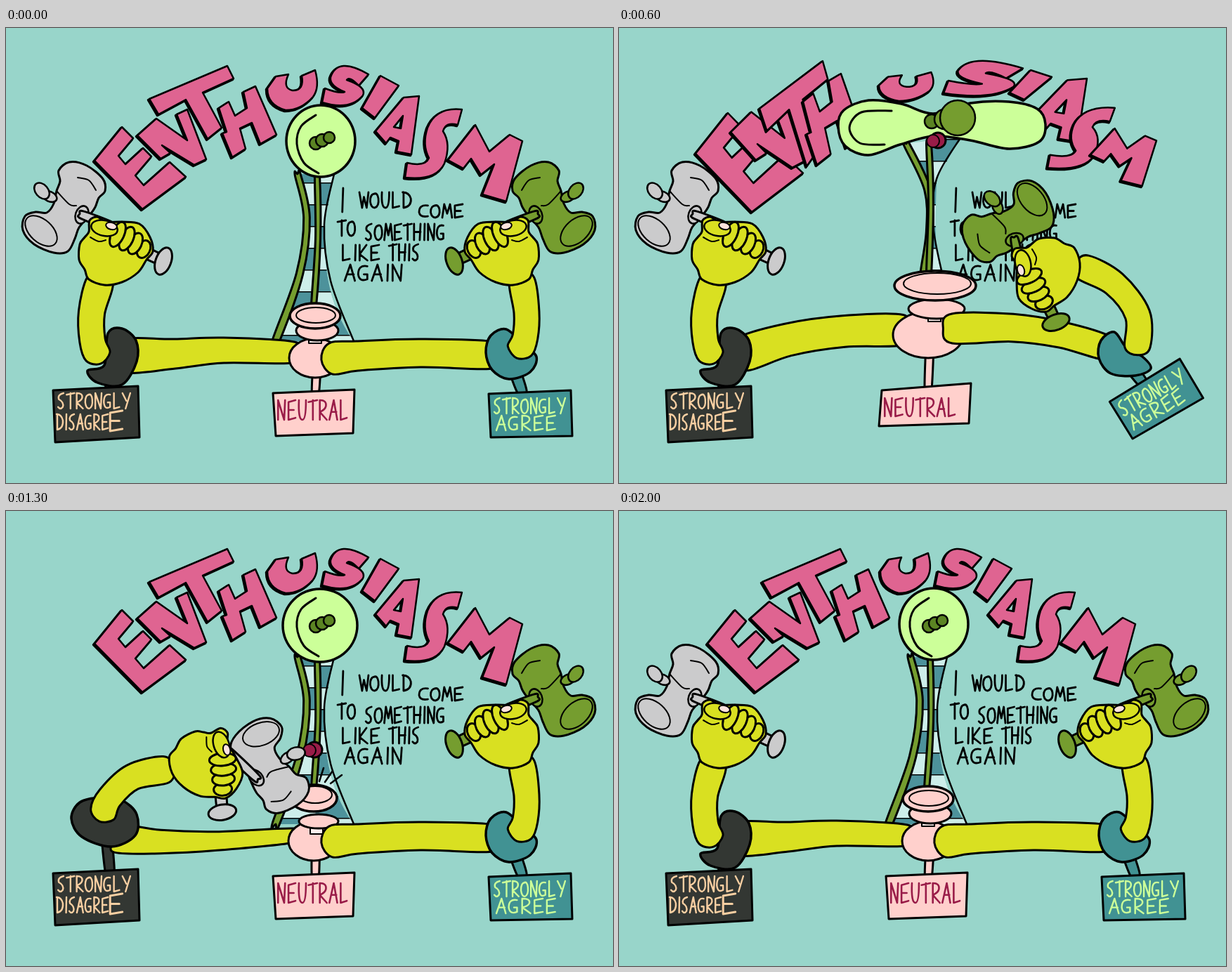
Write an HTML page with a canvas that moves like this. It is 864x648 px and loops after 2100 ms.

```html
<!DOCTYPE html>
<html lang="en">
<head>
<meta charset="utf-8">
<title>Enthusiasm</title>
<style>
html, body { margin: 0; width: 100%; height: 100%; overflow: hidden; background: #98d5ca; }
canvas { display: block; }
</style>
</head>
<body>
<canvas id="stage" width="864" height="648" role="img"
  aria-label="Enthusiasm: I would come to something like this again. Strongly disagree, neutral, strongly agree."></canvas>
<script>
const ctx = document.getElementById('stage').getContext('2d');
const YELLOW = '#d9e021', PINK = '#ffd0cc', ROSE = '#df6491', DARK = '#333733', TEAL = '#419293',
  GREEN = '#759d2f', GREY = '#cbcbcc', LIME = '#ccff99', MAROON = '#991c48', PALE = '#cdeeea';

const pts = s => s.split(' ').map(p => p.split(',').map(Number));
const mix = (a, b, t) => Array.isArray(a) ? a.map((v, i) => mix(v, b[i], t)) : a + (b - a) * t;

// Smooth path through points (Catmull-Rom)
function smooth(p, closed = true) {
  const path = new Path2D(), n = p.length;
  const at = i => closed ? p[(i + n) % n] : p[Math.max(0, Math.min(n - 1, i))];
  path.moveTo(...p[0]);
  for (let i = 0; i < (closed ? n : n - 1); i++) {
    const [a, b, c, d] = [at(i - 1), at(i), at(i + 1), at(i + 2)];
    path.bezierCurveTo(b[0] + (c[0] - a[0]) / 6, b[1] + (c[1] - a[1]) / 6,
      c[0] - (d[0] - b[0]) / 6, c[1] - (d[1] - b[1]) / 6, ...c);
  }
  if (closed) path.closePath();
  return path;
}

function ink(path, fill, width = 3) {
  ctx.fillStyle = fill;
  ctx.strokeStyle = '#000';
  ctx.lineWidth = width;
  if (fill) ctx.fill(path, 'evenodd');
  ctx.stroke(path);
}
const blob = (p, fill, width) => ink(smooth(p), fill, width);
const line = (p, width) => ink(smooth(p, false), null, width);
const poly = (p, fill) => ink(new Path2D('M' + p.join('L') + 'Z'), fill);

function oval(x, y, rx, ry, fill, deg = 0, width) {
  const path = new Path2D();
  path.ellipse(x, y, rx, ry, deg * Math.PI / 180, 0, 7);
  ink(path, fill, width);
}

// Limb with a width that runs from w0 to w1
function tube(p, w0, w1, fill, tip = .3) {
  const left = [], right = [], n = p.length - 1;
  const dir = i => {
    const a = p[Math.max(0, i - 1)], b = p[Math.min(n, i + 1)], l = Math.hypot(b[0] - a[0], b[1] - a[1]) || 1;
    return [(b[0] - a[0]) / l, (b[1] - a[1]) / l];
  };
  p.forEach(([x, y], i) => {
    const [dx, dy] = dir(i), h = mix(w0, w1, i / n) / 2;
    left.push([x - dy * h, y + dx * h]);
    right.unshift([x + dy * h, y - dx * h]);
  });
  const [sx, sy] = dir(0), [ex, ey] = dir(n);
  blob([...left, [p[n][0] + ex * w1 * tip, p[n][1] + ey * w1 * tip], ...right,
    [p[0][0] - sx * w0 * tip, p[0][1] - sy * w0 * tip]], fill);
}

function placed(x, y, deg, draw) {
  ctx.save();
  ctx.translate(x, y);
  ctx.rotate(deg * Math.PI / 180);
  draw();
  ctx.restore();
}

// Hand lettering on a 10 x 10 grid
const glyphs = {
  A: 'M0 10L5 0L9 10M2 6L8 6', C: 'M9 1Q0 0 0 6Q1 10 9 9', D: 'M1 0L1 10Q10 9 9 4Q7 0 0 0',
  E: 'M9 0L1 1L1 10L9 9M1 5L7 5', G: 'M8 1Q0 0 0 6Q1 11 8 9L8 6L5 6', H: 'M1 0L1 10M9 0L8 10M1 5L9 5',
  I: 'M5 0L4 10', K: 'M1 0L1 10M8 0L1 6L9 10', L: 'M1 0L1 10L8 9', M: 'M0 10L2 0L5 7L8 0L10 10',
  N: 'M1 10L1 0L8 10L9 0', O: 'M5 1Q0 1 0 6Q1 10 5 10Q10 9 9 4Q8 0 4 1',
  R: 'M1 10L1 0Q9 0 8 3Q7 5 1 6L9 10', S: 'M8 0Q0 1 2 4Q9 6 7 9Q4 11 1 9',
  T: 'M0 1L10 0M5 0L5 10', U: 'M1 0Q0 10 5 10Q9 10 9 0', W: 'M0 0L3 10L5 3L8 10L10 0', Y: 'M0 0L5 5M10 0L4 10'
};
function write(word, x, y, w, h, color, width = 2.4) {
  const share = c => c === 'I' ? .45 : 1;
  const unit = w / [...word].reduce((sum, c) => sum + share(c), 0);
  const path = new Path2D();
  for (const c of word) {
    const size = unit * share(c);
    path.addPath(new Path2D(glyphs[c]), new DOMMatrix([size * .084, 0, 0, h / 10, x, y]));
    x += size;
  }
  ctx.strokeStyle = color;
  ctx.lineWidth = width;
  ctx.stroke(path);
}

// Title letters: outline and its box
const letters = [
  ['M126 189L165 141L181 157L160 182L170 194L195 171L207 183L184 210L196 224L233 191L256 212L194 258Z', 126, 141, 130, 117],
  ['M187 153L214 129L258 160L243 123L258 116L285 187L268 195L222 167L234 178L220 186Z', 186, 116, 99, 80],
  ['M204 101L315 54L324 72L280 92L307 142L287 158L256 102L217 123Z', 204, 54, 121, 104],
  ['M303 114L317 105L326 125L343 114L338 91L355 83L385 152L362 165L350 135L333 143L341 172L322 184L308 150L314 148Z', 303, 83, 82, 101],
  ['M372 86L384 69L402 66Q393 86 408 89Q425 89 421 68L440 60Q447 85 437 98Q420 117 398 117Q372 110 372 86Z', 372, 60, 75, 57],
  ['M516 66L502 82Q488 68 485 74Q514 84 508 96Q490 118 450 106L454 86Q475 94 482 91Q460 82 462 70Q472 40 516 66Z', 450, 52, 66, 60],
  ['M533 68L559 82L525 128L507 114Z', 507, 68, 52, 60],
  ['M566 99L588 97L577 180L556 176L559 161L547 156L541 164L526 147ZM565 125L562 143L552 141Z', 526, 97, 62, 83],
  ['M649 116L643 138Q626 133 622 147Q634 165 624 193Q612 218 568 213L571 192Q597 198 602 185Q592 166 600 142Q612 112 649 116Z', 568, 114, 82, 102],
  ['M629 188L668 138L688 176L717 152L735 161L712 247L678 237L695 194L676 209L662 186L651 200Z', 629, 138, 106, 109]
];
const boxes = letters.map(l => l.slice(1));
const round = (x, y, rx, ry) => Array.from({ length: 16 }, (_, i) => {
  const a = Math.PI * (1 + i / 8);
  return [x + rx * Math.cos(a), y + ry * Math.sin(a)];
});

// Hands: fist x, y, angle, then gavel head x, y, angle; the right one is mirrored
const rest = {
  title: boxes,
  disc: round(448, 161, 49, 51),
  arc: pts('441,124 420,140 414,165 424,192 445,207'),
  boss: [[441, 164, 9], [450, 160, 9], [460, 156, 8]],
  edgeL: pts('411,208 424,270 414,350 380,446'),
  edgeR: pts('467,208 453,280 462,360 495,446'),
  rod: pts('443,210 444,300 438,396'),
  stripW: 10,
  cup: [[440, 470, 37, 28], [443, 431, 30, 14], [440, 410, 36, 18], [441, 409, 28, 11]],
  plate: pts('380,520 496,515 494,577 384,581'),
  label: [386, 530, 104, 28],
  armL: pts('170,467 240,464 310,459 410,462'), armLW: [48, 30],
  armR: pts('462,471 500,467 590,463 695,466'), armRW: [44, 38],
  cuffL: pts('145,435 165,428 185,445 186,475 165,508 130,505 116,488 140,480'),
  foreL: pts('134,360 122,405 123,445 131,468'),
  handL: [150, 318, 0, 82, 255, 0],
  cuffR: pts('712,429 690,438 683,462 692,487 716,500 746,490 755,468 735,450'),
  foreR: pts('734,358 741,405 739,440 731,460'),
  handR: [150, 318, 0, 82, 255, 0],
  tag: [746, 550, 0]
};
const wide = round(447, 163, 53, 52);
const hit = {
  ...rest, disc: wide,
  title: Object.assign([...boxes], { 9: [629, 142, 99, 81] }),
  edgeL: pts('412,212 421,270 405,370 350,500'),
  edgeR: pts('465,212 455,275 464,370 518,500'),
  stripW: 24,
  cup: [[409, 519, 46, 22], [425, 503, 36, 8], [425, 500, 36, 8], [425, 500, 28, 4]],
  plate: pts('348,554 526,545 530,577 352,584'),
  label: [354, 555, 164, 20],
  armL: pts('175,465 230,479 300,497 370,515'), armLW: [48, 38],
  armR: pts('462,512 520,497 600,473 720,469'), armRW: [32, 30],
  cuffR: pts('703,419 693,436 696,460 710,478 735,482 755,465 763,438 740,430'),
  foreR: pts('596,372 648,354 708,373 734,418'),
  handR: [300, 404, 155, 430, 434, 150],
  tag: [786, 499, -56]
};
const bounce = {
  ...rest,
  title: [[109, 121, 153, 141], [158, 104, 107, 96], [200, 47, 98, 150], [262, 65, 85, 130], [370, 63, 82, 41],
    [462, 45, 113, 53], [556, 60, 60, 42], [588, 72, 78, 90], [610, 112, 97, 90], [671, 143, 94, 82]],
  disc: pts('312,140 320,117 355,103 402,108 447,122 500,107 555,105 595,115 607,137 598,162 555,172 500,160 448,154 400,166 355,181 322,168'),
  arc: pts('388,118 345,120 328,142 343,164 378,166'),
  boss: [[445, 133, 10], [463, 130, 14], [482, 128, 25]],
  edgeL: pts('405,165 435,230 438,290 430,350'),
  edgeR: pts('487,155 452,215 447,280 460,350'),
  rod: pts('441,165 444,250 441,350'),
  cup: [[440, 437, 50, 33], [452, 400, 40, 14], [450, 367, 58, 21], [453, 364, 48, 15]],
  plate: pts('374,516 501,506 498,563 370,567'),
  label: [377, 527, 106, 26],
  armL: pts('175,465 240,444 320,432 405,430'), armLW: [48, 43],
  armR: pts('474,428 560,427 630,437 695,456'), armRW: [42, 34],
  cuffR: pts('705,433 686,445 683,470 700,492 735,495 757,485 745,468 722,455'),
  foreR: pts('660,340 705,364 738,408 738,455'),
  handR: [254, 345, 90, 309, 275, 88],
  tag: [764, 529, -29]
};
const chop = {
  ...rest, disc: wide,
  cup: [[438, 470, 36, 28], [445, 442, 28, 10], [438, 409, 33, 19], [440, 404, 24, 12]],
  armL: pts('155,466 220,471 300,470 410,462'), armLW: [40, 20],
  cuffL: pts('105,415 93,438 108,464 150,478 184,462 186,432 165,412 135,408'),
  foreL: pts('228,368 180,379 148,408 137,432'),
  handL: [283, 358, 60, 378, 362, 118]
};
const recoil = {
  ...rest, disc: wide,
  title: Object.assign([...boxes], { 0: [112, 131, 85, 80] }),
  cuffL: pts('150,425 175,430 183,455 172,492 140,500 108,485 105,462 135,455'),
  foreL: pts('160,356 128,392 122,432 131,460'),
  handL: [188, 315, 18, 155, 222, 47]
};

// Step, pose, easing power of the swing, easing power of everything it strikes
const keys = [[0, rest], [4, hit, 2, 9], [6, bounce, 1, 1], [9, rest, .6, .5],
  [13, chop, 2, 9], [16, recoil, .8, .4], [18, rest, 1, 1], [21, rest, 1, 1]];
const puckAt = { 4: [441, 275], 5: [442, 205], 6: [450, 160], 7: [443, 265], 8: [440, 355], 13: [435, 340], 14: [438, 318], 15: [437, 368] };
const swings = /^(cuff|fore|hand|tag)/;

function poseAt(step) {
  const i = keys.findIndex(k => k[0] > step);
  const [start, a] = keys[i - 1], [end, b, fast, late] = keys[i];
  const t = (step - start) / (end - start), pose = {};
  for (const k in a) pose[k] = mix(a[k], b[k], t ** (swings.test(k) ? fast : late));
  return pose;
}

function title(p) {
  letters.forEach(([d, x, y, w, h], i) => {
    const [bx, by, bw, bh] = p.title[i], path = new Path2D();
    path.addPath(new Path2D(d), new DOMMatrix().translate(bx, by).scale(bw / w, bh / h).translate(-x, -y));
    ctx.save();
    ctx.translate(-1.5, 1.5);
    ink(path, '#000', 3.5);
    ctx.restore();
    ink(path, ROSE, 2.5);
  });
}

function tower(p) {
  const body = smooth(p.edgeL, false), end = p.edgeR[3];
  body.lineTo(...end);
  const back = smooth([...p.edgeR].reverse(), false);
  const whole = new Path2D(body);
  const [e0, e1, e2, e3] = p.edgeR;
  whole.bezierCurveTo(e2[0] - (e3[0] - e1[0]) / 6, e2[1] + 30, e1[0], e2[1] - 30, ...e1);
  whole.lineTo(...e0);
  ctx.save();
  ctx.clip(whole);
  const split = (p.rod[0][0] + p.rod[2][0]) / 2;
  for (let i = -2; i < 10; i++) {
    const y = 220 + i * 31;
    for (const side of [0, 1]) {
      ctx.fillStyle = (i + side) % 2 ? '#4d929b' : PALE;
      ctx.fillRect(side ? split : 300, y, 300, 31);
      ctx.fillStyle = '#000';
      ctx.fillRect(side ? split : 300, y, 300, 1.5);
    }
  }
  ctx.restore();
  ink(back, null, 2.5);
  tube(p.edgeL.map(([x, y]) => [x + 4, y]), 8, p.stripW, GREEN, 0);
  tube(p.rod, 7, 7, GREEN, 0);
}

function bell(p) {
  blob(p.disc, LIME, 3.5);
  line(p.arc, 3);
  p.boss.forEach(([x, y, r]) => oval(x, y, r, r, r > 12 ? GREEN : '#5b8423', 0, 2.5));
}

function message() {
  [['I', 474, 228, 14, 34], ['WOULD', 503, 234, 77, 22], ['COME', 588, 251, 66, 19], ['TO', 472, 274, 28, 22],
    ['SOMETHING', 511, 279, 116, 23], ['LIKE', 478, 309, 57, 22], ['THIS', 545, 308, 46, 23], ['AGAIN', 482, 337, 86, 23]]
    .forEach(w => write(...w, '#000', 2.8));
}

function cup([base, ring, bowl, mouth]) {
  oval(...base, PINK);
  if (bowl[1] < 470) ink(new Path2D(`M${ring[0] - 12} ${ring[1]}v18h18v-18z`), '#fff0ee', 2);
  oval(...ring, PINK);
  oval(...bowl, PINK, 0, 3.5);
  oval(...mouth, PINK, 0, 2);
}

const headShape = pts('-7,-52 8,-64 33,-59 56,-40 59,-23 50,-13 45,0 36,13 22,29 16,45 6,63 -14,65 -42,53 -58,33 -55,13 -40,7 -24,8 -14,-5 -10,-23 -5,-37');
const fistShape = pts('-32,-28 -31,-44 -20,-49 -8,-42 15,-42 40,-39 55,-20 59,0 50,12 38,30 15,44 -10,48 -32,40 -38,26 -46,12 -45,-10 -38,-20');

function hand([fx, fy, fa, hx, hy, ha], metal, showHead) {
  const spin = (x, y, deg) => {
    const a = deg * Math.PI / 180;
    return [x * Math.cos(a) - y * Math.sin(a), x * Math.sin(a) + y * Math.cos(a)];
  };
  const [gx, gy] = spin(0, -36, fa), [nx, ny] = spin(26, 11, ha);
  if (showHead) placed(hx, hy, ha, () => {
    blob(headShape, metal);
    oval(-32, 34, 27, 16, metal, 42, 2);
    line(pts('-10,-23 8,-4 18,-2'), 2);
    line(pts('20,-42 36,-38 46,-24'), 2);
    oval(-20, -15, 11, 7, metal, 25, 2.5);
    oval(-31, -23, 9, 13, metal, -40, 2.5);
    oval(26, 11, 9, 13, metal, 20, 2.5);
  });
  tube([[hx + nx, hy + ny], [fx + gx, fy + gy]], 11, 11, metal);
  placed(fx, fy, fa, () => {
    tube([[36, -4], [72, 13]], 14, 14, metal, 0);
    oval(74, 14, 11, 20, metal, 20);
    blob(fistShape, YELLOW);
    [[46, -3, 13], [34, -11, 16], [22, -18, 18], [9, -24, 19]].forEach(([x, y, r]) => oval(x, y, 9, r, YELLOW, 25));
    oval(-10, -33, 19, 11, YELLOW, 12, 2.5);
    oval(0, -36, 8, 5, '#ffe3de', 15, 2);
    line(pts('-30,-20 -18,-14 -8,-16'), 2);
  });
}

function smashedHead() {
  blob(pts('428,330 432,370 423,408 408,430 396,455 373,464 368,480 376,499 430,506 488,493 496,472 478,456 463,445 455,408 450,370 454,330'), GREEN, 3.5);
  oval(441, 327, 20, 10, GREEN);
  oval(441, 326, 11, 5, GREEN, 0, 2);
  oval(402, 435, 12, 9, GREEN, 20);
  oval(386, 431, 9, 13, GREEN, 25);
  oval(460, 438, 10, 18, GREEN, -10);
  line(pts('370,474 395,486 430,489 470,484 494,470'));
  line(pts('388,458 412,469 445,469 475,457'));
}

const middle = p => p.reduce((s, q) => [s[0] + q[0] / p.length, s[1] + q[1] / p.length], [0, 0]);

function draw(step) {
  const p = poseAt(step), puck = puckAt[step];
  ctx.fillStyle = '#98d5ca';
  ctx.fillRect(0, 0, 864, 648);
  ctx.lineJoin = ctx.lineCap = 'round';
  title(p);
  tower(p);
  bell(p);
  message();
  if (puck) {
    oval(puck[0] + 4, puck[1], 11, 11, MAROON);
    oval(puck[0] - 3, puck[1] + 1, 9, 9, MAROON, 0, 2);
  }

  tube([middle(p.cuffL), [148, 515]], 13, 13, DARK);
  poly(pts('67,516 188,510 190,583 70,590'), DARK);
  write('STRONGLY', 73, 520, 106, 22, '#f8cfa2');
  write('DISAGRE', 72, 550, 76, 22, '#f8cfa2');
  write('E', 146, 545, 26, 29, '#f8cfa2', 3);

  const [base] = p.cup, top = mix(p.plate[0], p.plate[1], .52);
  tube([[base[0] + 3, base[1]], [top[0], top[1] + 3]], 10, 10, PINK, 0);
  poly(p.plate, PINK);
  write('NEUTRAL', ...p.label, MAROON, 2.6);

  tube([middle(p.cuffR), mix(middle(p.cuffR), p.tag, .6)], 14, 14, TEAL);
  placed(...p.tag, () => {
    poly(pts('-59,-29 58,-34 60,31 -56,33'), TEAL);
    write('STRONGLY', -52, -23, 104, 22, LIME);
    write('AGREE', -48, 2, 88, 21, LIME);
  });

  tube(p.armL, ...p.armLW, YELLOW, 0);
  cup(p.cup);
  if (step === 4) smashedHead();
  tube(p.armR, ...p.armRW, YELLOW);
  blob(p.cuffL, DARK, 3.5);
  tube(p.foreL, 38, 36, YELLOW);
  blob(p.cuffR, TEAL, 3.5);
  tube(p.foreR, 36, 36, YELLOW);
  hand(p.handL, GREY, true);
  ctx.save();
  ctx.translate(862, 0);
  ctx.scale(-1, 1);
  hand(p.handR, GREEN, step !== 4);
  ctx.restore();
  if (step === 13) ['446,385 452,366', '454,386 465,370', '462,388 478,376'].forEach(s => line(pts(s), 2.5));
}

const begin = performance.now();
function tick() {
  draw(Math.floor((performance.now() - begin) % 2100 / 100));
  requestAnimationFrame(tick);
}
tick();
</script>
</body>
</html>
```
